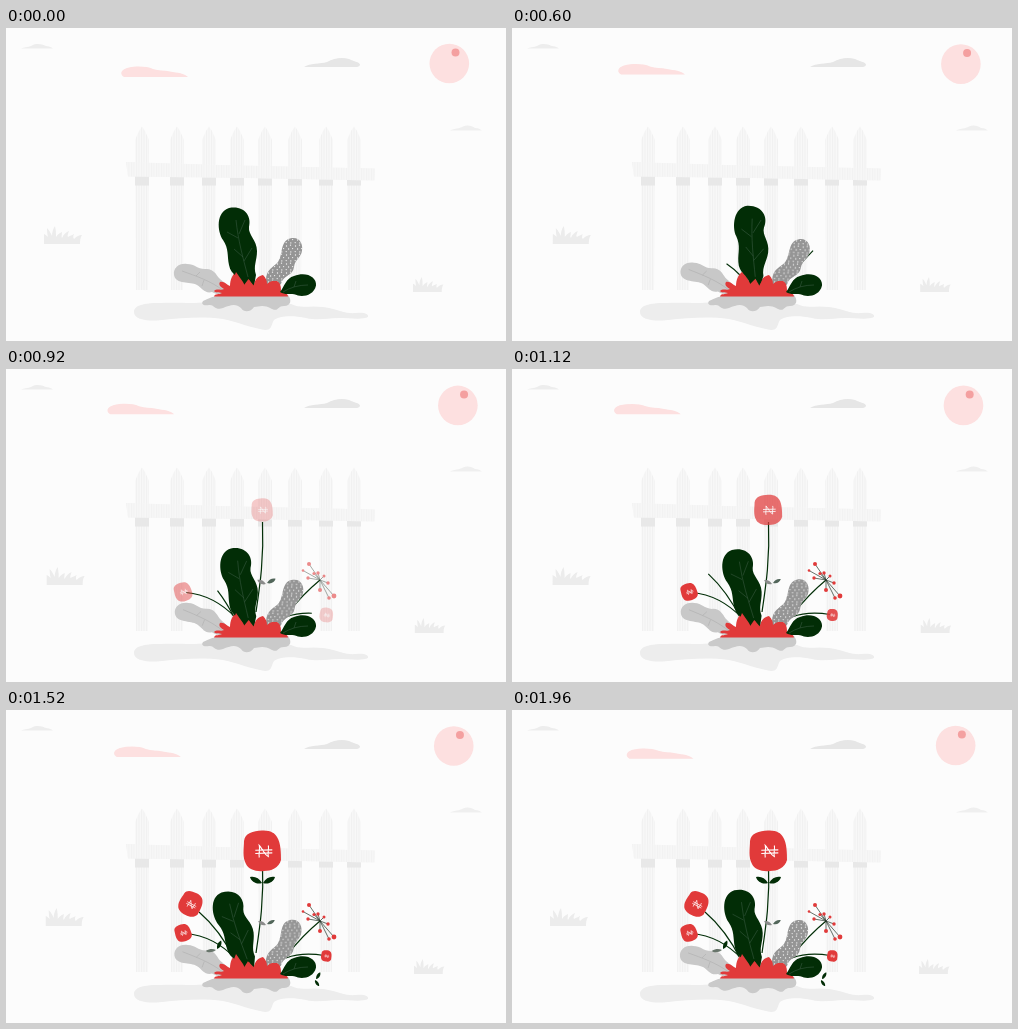
Recreate the animation shown at these times as an HTML page. Size 500 px wide and 313 px high, loop 2 s.

```html
<!DOCTYPE html>
<html lang="en">
<head>
<meta charset="utf-8">
<title>Garden</title>
<style>
html, body { margin: 0; width: 100%; height: 100%; overflow: hidden; background: #fcfcfc; }
svg { display: block; width: 100vw; height: 100vh; }
.stem { fill: none; stroke: #032f08; stroke-width: 1.2; stroke-dasharray: 1 2; }
.red { fill: #e13a3a; }
.green { fill: #022d06; }
.vein { fill: none; stroke: #41604a; stroke-width: .5; }
.sign { fill: none; stroke: #fff; stroke-width: 1.1; }
</style>
</head>
<body>
<svg viewBox="0 0 500 313">
  <defs>
    <pattern id="hatch" width="2.5" height="6" patternUnits="userSpaceOnUse">
      <rect width="2.5" height="6" fill="#f8f8f8"/><rect width="1" height="6" fill="#f0f0f0"/>
    </pattern>
    <pattern id="dots" width="9" height="9" patternUnits="userSpaceOnUse">
      <rect width="9" height="9" fill="#959595"/>
      <g fill="#f4f4f4">
        <circle cx="1.5" cy="2" r=".65"/><circle cx="5.5" cy="1.2" r=".65"/><circle cx="3.6" cy="5" r=".65"/>
        <circle cx="7.6" cy="4.6" r=".65"/><circle cx="1.2" cy="7.6" r=".65"/><circle cx="5.8" cy="7.9" r=".65"/>
      </g>
    </pattern>
    <path id="blob" d="M-18 -10C-17 -18 -9 -20 0 -20.5C8 -21 13 -18 15 -14C19 -8 19 3 19 9C17 17 9 20 2 20C-6 21 -14 18 -16 13C-20 6 -18 -3 -18 -10Z"/>
    <path id="naira" d="M-4 6C-5 2 -3 -2 -4 -6C-1 -3 1 3 5 5C4 1 6 -3 5 -6M-8 -1.2L9 -1.6M-8 2L9 1.4"/>
    <path id="bud" d="M0 0C3 -5 7 -7 12 -6C11 -2 6 2 0 0Z"/>
    <path id="grass" d="M0 18L0 8C2 9 3 10 4 11C3 7 3 4 3 2C6 5 7 8 8 10C8 6 9 3 11 0C12 4 12 8 12 11C14 8 16 7 18 6C18 9 17 11 18 12C20 8 22 6 25 5C24 8 23 10 24 11C27 9 29 9 30 8C29 10 29 12 30 13C33 10 35 9 38 9C36 12 36 15 36 18Z"/>
  </defs>

  <path fill="#ededed" d="M15 20.5C20 18.5 23 19.5 26 17.5C30 15 36 16 40 18C45 18.5 46 20 47 20.5Z"/>
  <path fill="#e6e6e6" d="M298 39C304 35 314 36 321 34C328 30 336 29 343 31C349 34 354 34 354 37C353 39 351 39 349 39Z"/>
  <path fill="#efefef" d="M444 102.5C449 100 453 101 457 98.500C462 96.500 466 98 469 100C473 100 475 102 476 102.500Z"/>
  <path id="cloud" fill="#fde0e0" d="M118 49C114 47 114 42 121 40C130 38 140 38 147 41C153 43 158 42 164 43.500C172 45 178 45 182 49Z"/>
  <g id="sun"><circle cx="443.300" cy="35.500" r="19.800" fill="#fde0e0"/><circle cx="449.500" cy="24.500" r="4" fill="#f4a0a0"/></g>

  <g id="fence" fill="url(#hatch)"></g>

  <g fill="#ececec">
    <g id="grassL"><use href="#grass" transform="translate(38 198)"/></g>
    <g id="grassR"><use href="#grass" transform="translate(407 249) scale(.8 .83)"/></g>
  </g>
  <path fill="#ededed" d="M128 284C128 277 139 275 152 275C175 274 185 276 200 274L285 276C295 281 303 277 317 279C332 281 338 286 350 285C358 284 363 286 362 289C357 292 343 290 333 290C320 290 313 293 300 290C286 287 273 288 268 292C265 297 266 302 259 302C245 300 232 294 217 291C195 288 176 290 156 292C140 294 128 291 128 284Z"/>
  <path fill="#cacaca" d="M197 273C203 270 208 268 215 267L282 267C286 272 285 278 278 278C271 278 273 284 266 281C257 276 253 279 248 279C245 284 238 285 235 280C230 275 224 277 217 280C209 283 208 276 203 277C197 278 195 276 197 273Z"/>

  <path class="stem" id="stemC" pathLength="1" d="M250 243C254 216 258 190 256.500 153"/>
  <path class="stem" id="stemL" pathLength="1" d="M229 250Q214 220 193 202"/>
  <path class="stem" id="stemS" pathLength="1" d="M230 249Q208 226 180 223.500"/>
  <path class="stem" id="stemB" pathLength="1" d="M282 244Q296 226 314 211"/>
  <path class="stem" id="stemR" pathLength="1" d="M280 248Q296 242 318 245.500"/>

  <g id="leafL">
    <path fill="#c8c8c8" d="M168 247C167 240 173 235 181 236C189 236 191 241 199 241C207 240 210 246 213 250C217 254 222 256 224 263C219 268 211 267 206 264C199 266 196 260 191 257C184 253 170 257 168 247Z"/>
    <path fill="none" stroke="#a9a9a9" stroke-width=".5" d="M176 243C190 248 205 253 218 263M190 248L194 244M198 252L196 258"/>
  </g>
  <path id="leafD" fill="url(#dots)" d="M260 252C260 241 268 239 272 234C277 227 274 213 284 210.500C294 208 298 217 295.500 225C293 231 289 232 288 239C287 248 277 247 275 256C269 262 259 262 260 252Z"/>

  <path class="red" d="M208 268.500C209 265 213 267 216 265C213 264 209 265 208 263C211 260 215 263 218 261C215 259 212 257 214 254C218 253 221 257 224 258C224 252 226 247 230 244C234 247 236 250 237 253L243 250L248 257C249 251 252 248 257 247C260 250 261 253 261 256C265 252 268 253 271 253C275 255 275 260 275 263C279 264 282 266 282 268.500Z"/>
  <path class="green" d="M274 264C278 259 280 250 288 248C300 243 311 249 310 257.500C308 267 298 269 292 267.500C285 264 280 268 274 264Z"/>
  <path class="vein" d="M277 264Q288 257 302 257M288 259L290 253"/>
  <g id="leafG">
    <path class="green" d="M238 257C234 248 225 248 223 237C221 227 223 221 217 212C211 203 210 184 223 180C238 177 246 188 243 199C242 207 251 212 251 223C251 233 247 238 250 247L248 258L242.500 251Z"/>
    <path class="vein" d="M230 192C232 212 237 230 242 249M232 210L221 204M233 206L239 192M237 229L228 221M238 233L246 220"/>
  </g>
  <path class="red" d="M223 262L230 244L237 254L239 258L243 252L247 258L251 251L257 262Z"/>

  <g id="budsLow">
    <use href="#bud" fill="#52665a" transform="translate(261 214) scale(.65)"/>
    <use href="#bud" fill="#8a8a8a" transform="translate(260 215) scale(-.65 .65)"/>
  </g>
  <g id="budsTop" class="green">
    <use href="#bud" transform="translate(257 173)"/><use href="#bud" transform="translate(256 173) scale(-1 1)"/>
  </g>
  <g id="budsL">
    <use href="#bud" class="green" transform="translate(211 239) rotate(-38) scale(.7)"/>
    <use href="#bud" fill="#68756b" transform="translate(210 240) rotate(-24) scale(-.8 .55)"/>
  </g>
  <g id="budsR" class="green">
    <use href="#bud" transform="translate(310 269) rotate(-32) scale(.6)"/>
    <use href="#bud" transform="translate(309 270) rotate(82) scale(.55)"/>
  </g>
  <g id="burst"></g>
  <g id="flowers"></g>
</svg>
<script>
const $ = id => document.getElementById(id);

const posts = [129, 164, 196, 224, 252, 282, 313, 341];
$('fence').innerHTML =
  posts.map(x => `<path d="M${x} 112L${x + 4} 103L${x + 7} 98.500L${x + 10} 103L${x + 14} 112L${x + 13} 262H${x + 1}Z"/>`).join('') +
  posts.map(x => `<rect x="${x}" y="146" width="14" height="11.500" fill="#e8e8e8"/>`).join('') +
  '<path d="M120 134L215 137L369 140.500L368.500 152.500L240 150L122 148.500Z" fill="#f5f5f5"/>' +
  '<path d="M120 134L215 137L369 140.500L368.500 152.500L240 150L122 148.500Z" opacity=".6"/>';

// Rays: tip x, tip y, dot radius
const rays = [[303, 195, 2], [297, 201.5, 1.3], [302, 209, 1.7], [308, 204.5, 1.6], [312, 204, 1.7],
  [318, 207, 1.5], [322, 214, 1.7], [328, 227, 2.4], [323, 229, 1.8], [314, 221, 2]];
$('burst').innerHTML = rays.map(([x, y, r]) =>
  `<path d="M314 211L${x} ${y}" stroke="#24352a" stroke-width=".7"/><circle class="red" cx="${x}" cy="${y}" r="${r}"/>`).join('');

// Flowers: id, centre, size, sign angle
const flowers = [['flowerC', 256, 141, 1, 0], ['flowerL', 184.5, 194, .6, 30],
  ['flowerS', 177, 223, .43, -15], ['flowerR', 320.3, 246, .28, 10]];
$('flowers').innerHTML = flowers.map(([id, x, y, s, a]) =>
  `<g id="${id}"><g transform="translate(${x} ${y}) scale(${s}) rotate(${a})">
   <use href="#blob" class="red"/><use href="#naira" class="sign" x="1.300" y=".5"/></g></g>`).join('');

// Linear interpolation over [time, value, time, value, ...]
function at(t, keys) {
  if (t <= keys[0]) return keys[1];
  for (let i = 2; i < keys.length; i += 2)
    if (t < keys[i]) {
      const k = (t - keys[i - 2]) / (keys[i] - keys[i - 2]);
      return keys[i - 1] + k * (keys[i + 1] - keys[i - 1]);
    }
  return keys[keys.length - 1];
}

const stems = {
  stemC: [560, 0, 900, 1],
  stemL: [800, 0, 920, .55, 1160, 1],
  stemS: [520, 0, 600, .35, 860, 1],
  stemB: [480, 0, 600, .62, 760, 1],
  stemR: [780, 0, 920, .68, 1020, 1],
};

// Pop-ins: id, pivot, scale keys, opacity keys
const pops = [
  ['flowerC', 256, 141, [820, .4, 920, .57, 1320, .92, 1480, 1], [820, 0, 920, .25, 1240, 1]],
  ['flowerL', 184.5, 194, [1160, 1.4, 1320, 1.15, 1440, 1], [1160, 0, 1320, .75, 1420, 1]],
  ['flowerS', 177, 223, [760, 1.25, 920, 1.08, 1120, 1], [760, 0, 920, .45, 1120, 1]],
  ['flowerR', 320.3, 246, [860, 1.4, 920, 1.3, 1160, 1], [860, 0, 920, .22, 1160, 1]],
  ['burst', 314, 211, [720, 1, 800, 1], [720, 0, 920, .58, 1120, 1]],
  ['budsLow', 261, 214, [800, .3, 920, 1.1, 1080, 1], [800, 0, 880, 1]],
  ['budsTop', 256.5, 173, [1160, .3, 1320, .88, 1440, 1], [1160, 0, 1260, 1]],
  ['budsL', 211, 239, [1340, .3, 1500, 1], [1340, 0, 1440, 1]],
  ['budsR', 311, 269, [1180, 1.5, 1320, 1.2, 1480, 1], [1180, 0, 1320, 1]],
];

const sway = [0, 0, 280, 3.7, 600, 8.9, 920, 1.5, 1320, -6.1, 1420, -6.6, 1520, -5.7, 1960, -.5, 2000, 0];
const move = (id, value) => $(id).setAttribute('transform', value);

function draw(now) {
  const t = now % 2000;
  const swing = 1 - Math.abs(t / 1000 - 1);
  move('cloud', `translate(${-15 * swing} ${-4.2 * swing})`);
  move('sun', `translate(${9.3 * swing} ${swing})`);
  move('grassL', `translate(${at(t, [280, 0, 600, 2.8, 1320, 2.5, 1960, 0])} 0)`);
  move('grassR', `translate(${2 * swing} 0)`);
  move('leafG', `rotate(${at(t, sway)} 244 257)`);
  move('leafL', `rotate(${3.2 * swing} 222 262)`);
  move('leafD', `rotate(${at(t, [0, 0, 600, 2.6, 920, 1.8, 1320, -.5, 1520, -1, 2000, 0])} 265 257)`);
  for (const id in stems) {
    const grown = at(t, stems[id]);
    $(id).style.strokeDashoffset = 1 - grown;
    $(id).style.visibility = grown ? 'visible' : 'hidden';
  }
  for (const [id, x, y, scale, fade] of pops) {
    move(id, `translate(${x} ${y}) scale(${at(t, scale)}) translate(${-x} ${-y})`);
    $(id).style.opacity = at(t, fade);
  }
}

const start = performance.now();
(function tick() {
  draw(performance.now() - start);
  requestAnimationFrame(tick);
})();
</script>
</body>
</html>
```
